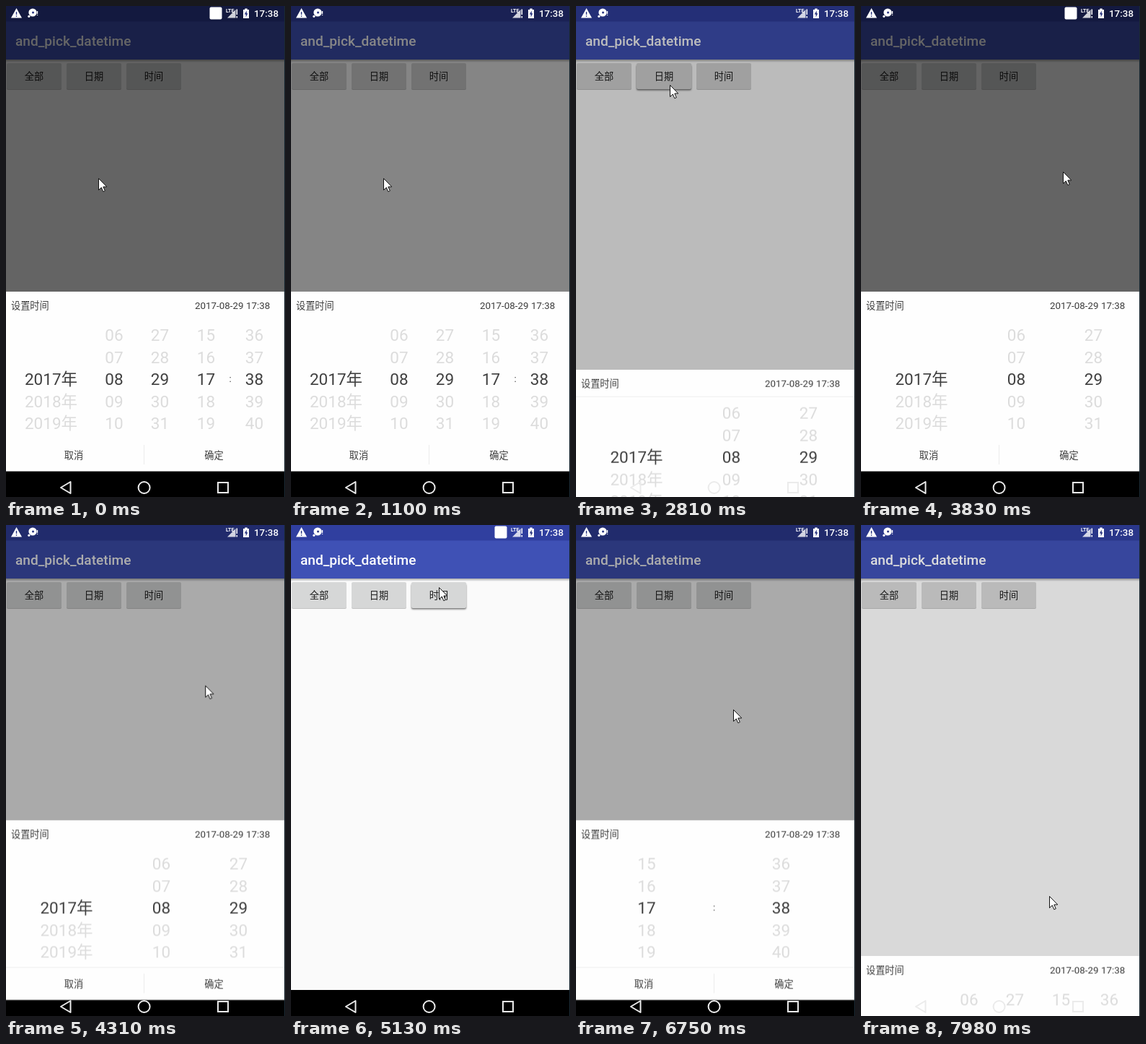
An HTML page that plays this animation: 387x679 px, repeating every 8000 ms.

```html
<!DOCTYPE html>
<html lang="zh-CN">
<head>
<meta charset="utf-8">
<title>and_pick_datetime</title>
<style>
html, body { margin: 0; width: 100%; height: 100%; overflow: hidden; background: #fafafa; }
svg { display: block; width: 387px; height: 679px; }
text { font-family: Roboto, "Noto Sans CJK SC", "Noto Sans CJK", sans-serif; }
.mid { text-anchor: middle; }
.small { font-size: 13.2px; fill: #3c3c3c; }
.date { font-size: 13.4px; }
.num { font-size: 22.5px; fill: #dcdcdc; }
.now { fill: #404040; }
.title { font-size: 19.1px; font-weight: 500; fill: #fff; }
.clock { font-size: 13.4px; font-weight: 500; fill: #fff; }

/* one loop = 8000 ms, so 1% = 80 ms */
#dim, #ime, #cursor, .sheet, .lift, .headLine, .footLine {
  animation: 8s linear infinite;
}
#dim { animation-name: dim; }
#ime { animation-name: ime; animation-timing-function: step-end; }
#cursor { animation-name: cursor; }
#all { animation-name: all; }
#day { animation-name: day; }
#hour { animation-name: hour; }
.lift { opacity: 0; animation-timing-function: step-end; }
#lift0 { animation-name: lift0; }
#lift1 { animation-name: lift1; }
#lift2 { animation-name: lift2; }
.headLine { animation-name: headLine; animation-timing-function: step-end; }
.footLine { animation-name: footLine; animation-timing-function: step-end; }

@keyframes dim {
  0%, 13.125% { opacity: .6; }
  16.125%, 33.55% { opacity: 0; }
  37.3%, 52.5% { opacity: .6; }
  55.5%, 69.5625% { opacity: 0; }
  73.3125%, 83% { opacity: .6; }
  86%, 98.925% { opacity: 0; }
  100% { opacity: .172; }
}
@keyframes all {
  0% { transform: translateY(0); }
  13.8% { transform: translateY(0); animation-timing-function: cubic-bezier(.333, 0, .667, .333); }
  17.0875%, 99.25% { transform: translateY(284px); }
  99.75% { transform: translateY(203px); }
  100% { transform: translateY(169px); }
}
@keyframes day {
  0% { transform: translateY(284px); }
  33.875% { transform: translateY(284px); animation-timing-function: cubic-bezier(.333, .667, .667, 1); }
  37.1625% { transform: translateY(0); }
  53.175% { transform: translateY(0); animation-timing-function: cubic-bezier(.333, 0, .667, .333); }
  56.4625%, 100% { transform: translateY(284px); }
}
@keyframes hour {
  0% { transform: translateY(284px); }
  69.875% { transform: translateY(284px); animation-timing-function: cubic-bezier(.333, .667, .667, 1); }
  73.1625% { transform: translateY(0); }
  83.675% { transform: translateY(0); animation-timing-function: cubic-bezier(.333, 0, .667, .333); }
  86.9625%, 100% { transform: translateY(284px); }
}
@keyframes ime {
  0%, 18%, 38.75%, 57.5%, 75%, 88% { opacity: 1; }
  13.6%, 33.6%, 53%, 69.6%, 83.5%, 98.9%, 100% { opacity: 0; }
}
@keyframes headLine {
  0%, 37.1625%, 73.1625%, 100% { opacity: 0; }
  33.875%, 69.875% { opacity: 1; }
}
@keyframes footLine {
  0%, 17.1%, 56.5%, 87%, 100% { opacity: 0; }
  13.8%, 53.175%, 83.675% { opacity: 1; }
}
@keyframes lift0 {
  0%, 96.5%, 100% { opacity: 0; }
  94% { opacity: 1; }
}
@keyframes lift1 {
  0%, 35.75%, 100% { opacity: 0; }
  29.125% { opacity: 1; }
}
@keyframes lift2 {
  0%, 70.5%, 100% { opacity: 0; }
  64.125% { opacity: 1; }
}
@keyframes cursor {
  0%, 20% { transform: translate(128px, 238px); }
  23.875%, 25.875% { transform: translate(119px, 76px); }
  26.75%, 32.125% { transform: translate(129px, 98px); }
  33.6%, 35.7% { transform: translate(130px, 109px); }
  41%, 43.12% { transform: translate(280px, 226px); }
  43.125%, 47.87% { transform: translate(280px, 227px); }
  47.875%, 53.5% { transform: translate(280px, 229px); }
  61.125%, 71% { transform: translate(205px, 86px); }
  77.625%, 78% { transform: translate(224px, 235px); }
  79.875%, 86.25% { transform: translate(218px, 255px); }
  92%, 95.5% { transform: translate(40px, 90px); }
  99.7%, 100% { transform: translate(261px, 513px); }
}
</style>
</head>
<body>
<svg viewBox="0 0 387 679">
  <defs>
    <linearGradient id="shade" x2="0" y2="1">
      <stop offset="0" stop-opacity=".32"/>
      <stop offset="1" stop-opacity="0"/>
    </linearGradient>
    <filter id="soft" x="-10%" y="-20%" width="120%" height="150%">
      <feGaussianBlur stdDeviation="1.3"/>
    </filter>
  </defs>

  <rect width="387" height="679" fill="#fafafa"/>
  <rect y="74" width="387" height="4" fill="url(#shade)"/>
  <rect width="387" height="22" fill="#303f9f"/>
  <rect y="21.5" width="387" height="52.5" fill="#3f51b5"/>
  <text class="title" x="13" y="55">and_pick_datetime</text>
  <g id="buttons"></g>
  <rect id="dim" width="387" height="679"/>

  <g id="status" fill="#fff">
    <path d="M14.5 3L22 16.5H7Z"/>
    <path d="M14.5 8V12M14.5 13.3V14.8" stroke="#26327f" stroke-width="1.4"/>
    <circle cx="37" cy="9" r="5.6"/>
    <circle cx="37.5" cy="9" r="1.5" fill="#26327f"/>
    <circle cx="31.8" cy="14.3" r="1.6"/>
    <path d="M43.5 7V11M43.5 12V13" stroke="#fff" stroke-width="1.3"/>
    <rect id="ime" x="282.5" y="1.5" width="17" height="17" rx="2"/>
    <text x="305" y="9" font-size="7" font-weight="700" textLength="">LTE</text>
    <path d="M307 16.5L318.5 5V16.5Z" opacity=".8"/>
    <path d="M320.3 4.5V12M320.3 14V16.5" stroke="#fff" stroke-width="1.5"/>
    <path d="M329 5H331.3V3.5H334.7V5H337V17H329Z"/>
    <path d="M333.8 6.5L330.8 11.6H332.7V15.5L335.4 10.2H333.8Z" fill="#26327f"/>
    <text class="clock" x="344" y="15">17:38</text>
  </g>

  <rect y="643" width="387" height="36"/>
  <g id="sheets"></g>
  <g fill="none" stroke="#ebebeb" stroke-width="2">
    <path d="M76 666L89.5 658V674Z" stroke-linejoin="round"/>
    <circle cx="191.6" cy="666" r="8"/>
    <rect x="294" y="659" width="14" height="14"/>
  </g>
  <rect x="386" width="1" height="679" fill="#1a2a33"/>
  <path id="cursor" d="M.5 .5V16.5L4.3 13L6.8 18.7L9.3 17.6L6.8 12H11.8Z" fill="#fff" stroke="#111" stroke-width="1"/>
</svg>
<script>
const $ = id => document.getElementById(id);
const label = (s, x, y, cls) => `<text class="${cls}" x="${x}" y="${y}">${s}</text>`;
const rect = (x, y, w, h, extra) => `<rect x="${x}" y="${y}" width="${w}" height="${h}" ${extra}/>`;
const pad = n => String(n).padStart(2, "0");

$("buttons").innerHTML = ["全部", "日期", "时间"].map((s, i) => {
  const x = 1 + i * 83;
  return rect(x, 80, 76, 36, `rx="2" opacity=".22"`) +
    rect(x, 81.5, 76, 35, `id="lift${i}" class="lift" rx="2" fill="#777" filter="url(#soft)"`) +
    rect(x, 79, 76, 36, `rx="2" fill="#d6d7d7"`) +
    `<text class="mid" x="${x + 38}" y="101.5" font-size="13.2" fill="#1c1c1c">${s}</text>`;
}).join("");

// Five rows centred on the chosen value; years start at the chosen one
function wheel([value, x]) {
  const isYear = value > 99;
  let out = "";
  for (let d = isYear ? 0 : -2; d <= 2; d++) {
    const s = isYear ? value + d + "年" : pad(value + d);
    out += label(s, x, 524 + d * 30.5, "mid num" + (d ? "" : " now"));
  }
  return out;
}

function sheet(id, wheels, colon) {
  return `<g id="${id}" class="sheet">` +
    rect(0, 395, 387, 248.5, `fill="#fefefe"`) +
    rect(0, 432, 387, 1, `class="headLine" fill="#eee"`) +
    rect(0, 598, 387, 1, `class="footLine" fill="#eee"`) +
    rect(191, 607, 1, 27, `fill="#ececec"`) +
    label("设置时间", 7, 418.7, "small") +
    label("2017-08-29 17:38", 262, 418.7, "small date") +
    wheels.map(wheel).join("") +
    (colon ? label(":", colon, 520, "mid small") : "") +
    label("取消", 94, 625.5, "mid small") +
    label("确定", 288.5, 625.5, "mid small") + "</g>";
}

$("sheets").innerHTML =
  sheet("all", [[2017, 62.5], [8, 150], [29, 213.5], [17, 277.5], [38, 344.5]], 311) +
  sheet("day", [[2017, 84], [8, 215.5], [29, 322.5]]) +
  sheet("hour", [[17, 98], [38, 284.5]], 191.5);
</script>
</body>
</html>
```
